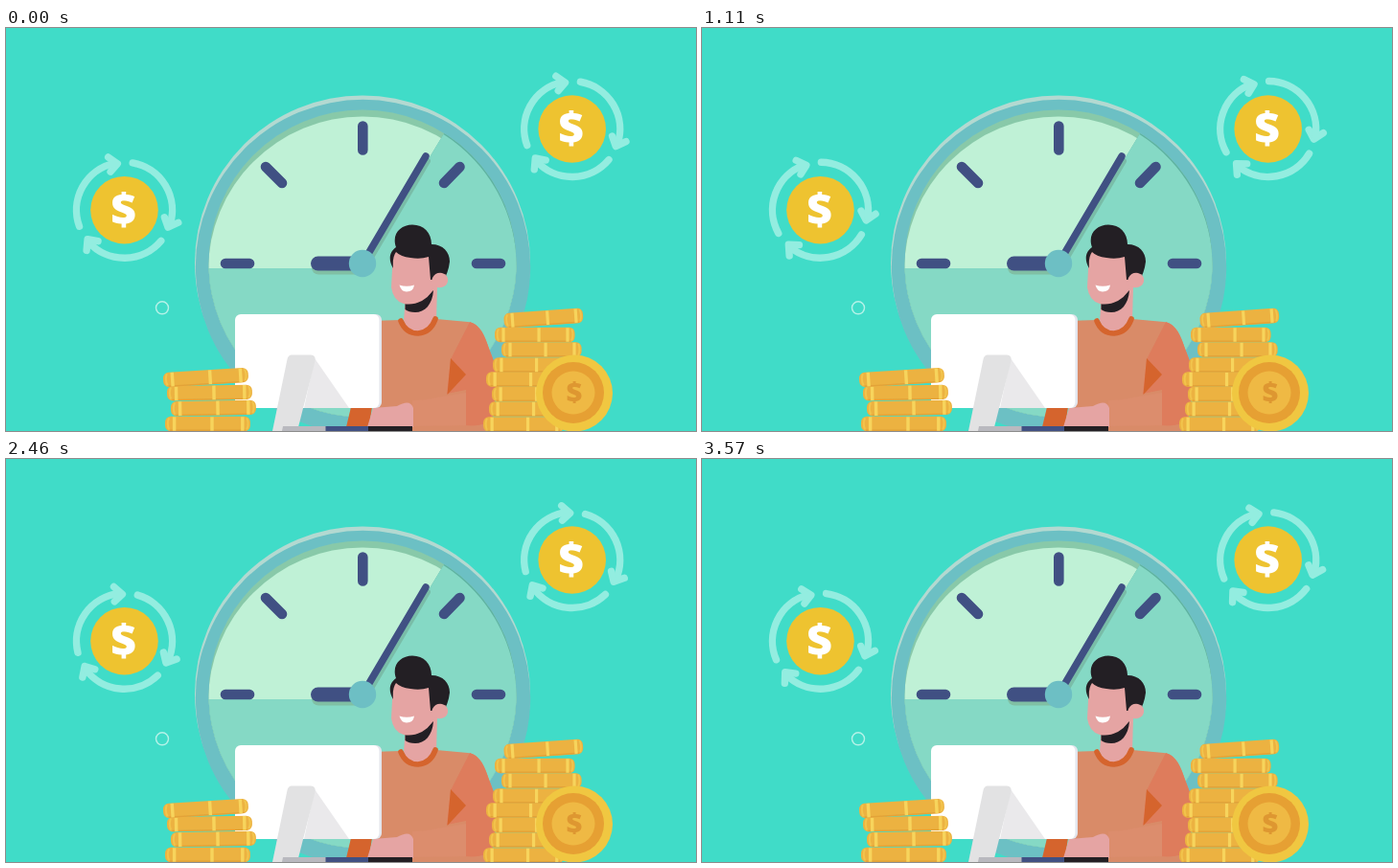
Write an HTML page that moves like this. It is 720x421 px and loops after 3.6 s.

```html
<!DOCTYPE html>
<html lang="en">
<head>
<meta charset="utf-8">
<title>Time and money</title>
<style>
  html, body { margin: 0; width: 100%; height: 100%; overflow: hidden; background: #40dcc8; }
  svg { display: block; width: 100vw; height: 100vh; }
  text { font-family: "Open Sans", "Noto Sans", sans-serif; font-weight: 800; text-anchor: middle; }
</style>
</head>
<body>
<svg viewBox="0 0 720 421" xmlns="http://www.w3.org/2000/svg">
  <defs>
    <clipPath id="dial"><circle cx="372" cy="246" r="160.5"/></clipPath>
    <g id="arrow" fill="none" stroke="#93ede0" stroke-width="7.4" stroke-linecap="round" stroke-linejoin="round">
      <path id="arc"/>
      <path d="M-8 -57.2L0.5 -49L-8 -41.8"/>
    </g>
    <g id="ring">
      <use href="#arrow"/>
      <use href="#arrow" transform="rotate(120)"/>
      <use href="#arrow" transform="rotate(240)"/>
    </g>
    <g id="coin">
      <rect width="88" height="15.4" rx="6" fill="#ecb241"/>
      <path d="M5 14.5H83" stroke="#e3a338" stroke-width="1.4"/>
      <path d="M9.5 .4V15M48.5 .4V15M80 .4V15" stroke="#f7d45c" stroke-width="3.4"/>
      <path d="M4 1.5Q1.5 7.5 4 13.5M84.5 1.5Q87 7.5 84.5 13.5" fill="none" stroke="#f2c44c" stroke-width="2"/>
    </g>
  </defs>

  <rect width="720" height="421" fill="#40dcc8"/>
  <circle cx="163" cy="292.3" r="6.5" fill="none" stroke="#b5f2e8" stroke-width="1.4"/>

  <!-- clock -->
  <circle cx="372" cy="245.5" r="175" fill="#b3d9d1"/>
  <circle cx="372.5" cy="249.5" r="174.7" fill="#6cc0c4"/>
  <g clip-path="url(#dial)">
    <rect x="200" y="80" width="350" height="341" fill="#88c9a9"/>
    <circle cx="372" cy="253.5" r="161" fill="#bff1d6"/>
    <path d="M372 251L468 92H560V421H200V251Z" fill="#5db2a2"/>
    <path d="M372 251L456.5 111A166 166 0 0 1 533 253V421H200V251Z" fill="#85d9c5"/>
  </g>
  <g stroke-linecap="round">
    <path d="M326 250.5H372" stroke="#80bfa4" stroke-width="14"/>
    <path d="M376 248L440 139" stroke="#79bda8" stroke-width="6"/>
    <g stroke="#405083" stroke-width="10.6">
      <path d="M372.3 102.5V127.5M457 162L473.5 145M271 145L288 162M229 246H254M491 246H516"/>
      <path d="M325.5 246H372" stroke-width="15"/>
      <path d="M372 246L438 134" stroke-width="7.4"/>
    </g>
  </g>
  <circle cx="372" cy="246" r="14.2" fill="#6dbfc4"/>

  <!-- worker -->
  <path d="M380 306L412 305Q430 320 449 304L482 307C492 308 498 316 503 332L514 362L506 421H384Z" fill="#d98b68"/>
  <path d="M484 307C494 310 499 320 504 335L516 366L505 410Q498 417 478 415L480 378L460 382L464 346Z" fill="#de7c5c"/>
  <path d="M464 345L480 362L460.500 383Z" fill="#d5642d"/>
  <path d="M424 389Q438 389 450 386L480 381V415L424 416Z" fill="#dc8d6d"/>
  <path d="M360 396H382L378 421H354Z" fill="#d5642d"/>
  <path d="M383 397L408 395Q422 387 425 397V417H377Z" fill="#e5a4a3"/>
  <path d="M417 280L446 258L450 270L449 306Q441 319 430 319Q419 317 415 306Z" fill="#e5a4a3"/>
  <path d="M412 306Q417 319 430 319Q443 318 448 304" fill="none" stroke="#d5642d" stroke-width="5.6" stroke-linecap="round"/>
  <path d="M416.500 286Q434 288 446 274C445 289 437 297 427 297Q420 297 416.500 294Z" fill="#231f24"/>
  <path d="M404 234L444 232L449 262Q446 279 434 285Q424 290 415 288Q404 285 402 271Z" fill="#e5a4a3"/>
  <path d="M404 251C398 241 401 233 407 229C402 215 412 205.500 424 205.500C436 205.500 444 214 444 226C456 226 463 234 463 244Q462 254 457 263H443L441 239Q432 242 422 240Q412 239 407 234Q403 239 404 251Z" fill="#231f24"/>
  <path d="M445 261Q448 255 455 256Q462 258 461 265Q459 272 450 271L443 268Z" fill="#e5a4a3"/>
  <path d="M410.500 268.500Q418 271 426 268.500Q425 275.500 418 275.500Q412 275 410.500 268.500Z" fill="#fff"/>

  <!-- computer -->
  <rect x="250" y="299" width="142" height="98" rx="6" fill="#e2e5ec"/>
  <rect x="239" y="299" width="150.500" height="98" rx="6" fill="#fff"/>
  <path d="M322 345L358 397H311Z" fill="#eae9eb"/>
  <path d="M298 341.500H318Q323.500 341.500 322.500 348L304 421H278L293.500 346Q294.500 341.500 298 341.500Z" fill="#e2e2e3"/>
  <path d="M289 416H334V421H288Z" fill="#b9b9bf"/>
  <path d="M333.500 416H379V421H333.500Z" fill="#405083"/>
  <path d="M378 416H424V421H378Z" fill="#231f24"/>

  <g id="stacks"></g>
  <circle cx="593" cy="381.500" r="40" fill="#f0c741"/>
  <circle cx="592" cy="381" r="32" fill="#e6a033"/>
  <circle cx="592" cy="381" r="22.500" fill="#efb944"/>
  <text x="593" y="390.500" font-size="29" fill="#de9731">$</text>

  <g id="badges"></g>
</svg>
<script>
  const LOOP = 3600, STEP = 30;
  const byId = id => document.getElementById(id);

  // Bearing runs clockwise from the top.
  const polar = (deg, r) => {
    const a = deg * Math.PI / 180;
    return `${(r * Math.sin(a)).toFixed(2)} ${(-r * Math.cos(a)).toFixed(2)}`;
  };
  byId('arc').setAttribute('d', `M${polar(19, 50)}A50 50 0 0 1 ${polar(117, 50)}`);

  // Each coin: left edge, centre height, tilt, length scale.
  const coins = [
    [166, 413.5, 0, 1.01], [172, 397, -1, 1.01], [168, 381, -1, 1.01], [164, 365, -3.5, 1.01],
    [498, 414, 0, .96], [504, 398, 0, .96], [507, 382.5, 0, .96], [501, 367, 0, .96],
    [508, 352, 0, .94], [517, 336, 0, .95], [510, 320.5, 0, .95], [519.5, 303, -4, .94]
  ];
  byId('stacks').innerHTML = coins.map(([x, y, tilt, k]) =>
    `<use href="#coin" transform="translate(${x + 44 * k} ${y}) rotate(${tilt}) scale(${k} 1) translate(-44 -7.7)"/>`
  ).join('');

  const badges = [[123.5, 190.2], [590.7, 105.5]];
  byId('badges').innerHTML = badges.map(([x, y]) =>
    `<g transform="translate(${x} ${y})">
      <g class="spin"><use href="#ring"/></g>
      <circle r="35.3" fill="#eec330"/>
      <text x="-.9" y="15.6" font-size="46" fill="#fff">$</text>
    </g>`
  ).join('');

  const spinners = document.querySelectorAll('.spin');

  function draw(ms) {
    const t = Math.floor((ms % LOOP) / STEP) * STEP;
    const turn = 360 * t / LOOP - 9;
    spinners.forEach(s => s.setAttribute('transform', `rotate(${turn})`));
  }

  function tick() {
    draw(performance.now());
    requestAnimationFrame(tick);
  }
  draw(0);
  requestAnimationFrame(tick);
</script>
</body>
</html>
```
